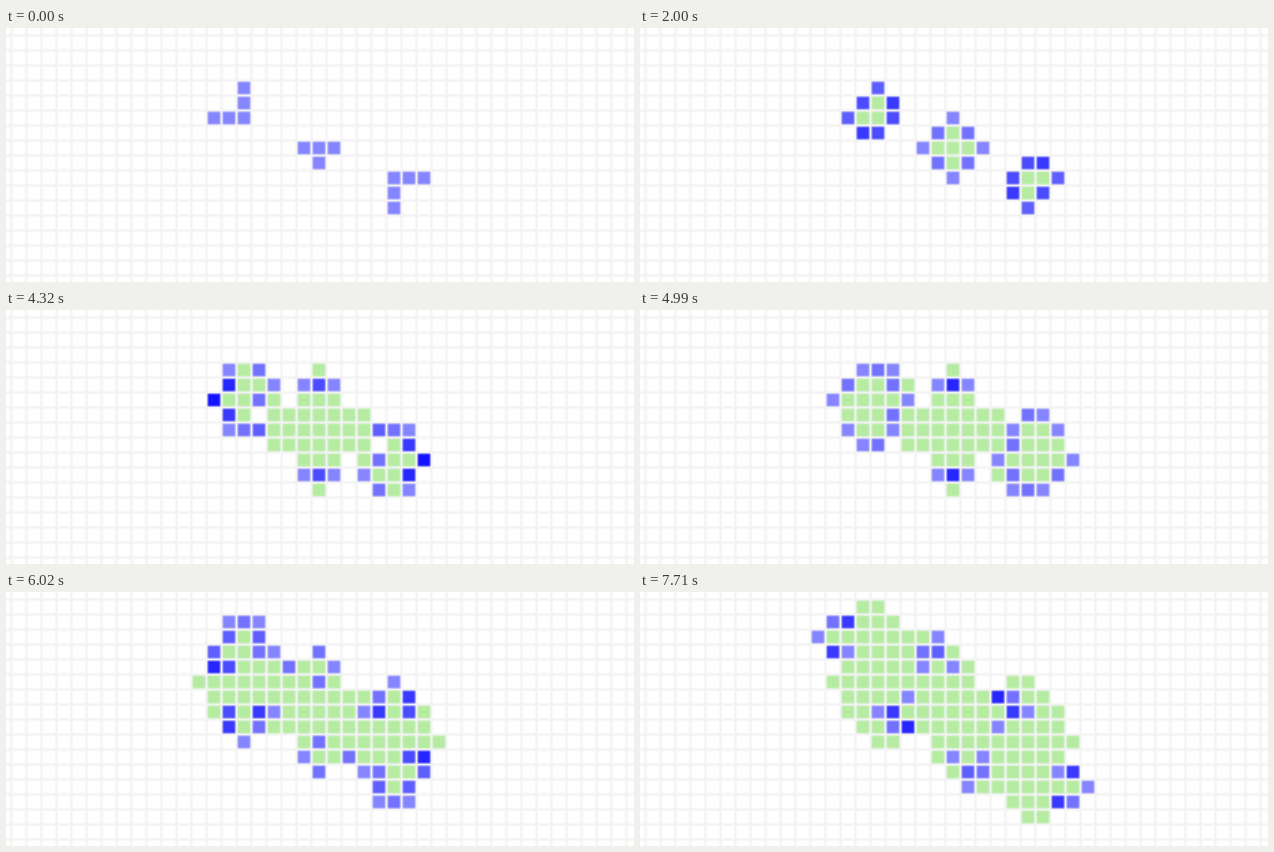
Write a matplotlib script that moves like this. It is 628 px wide and 254 px high and loops after 8000 ms.

```python
import matplotlib.pyplot as plt
import numpy as np
from matplotlib.animation import FuncAnimation

WIDTH, HEIGHT, DPI = 628, 254, 100
LOOP_MS, TICK_MS = 8000, 10
PITCH, OFFSET_X, OFFSET_Y = 15, 10, 8
EDGE = 2.5  # softness of a cell's border in pixels

GRID = np.array([243, 243, 243])
DEAD = np.array([255, 255, 255])
TRAIL = np.array([181, 236, 162])

# Moments at which the next generation appears
STEPS_MS = [420, 790, 1120, 1600, 2000, 2400, 2730, 3210, 3520, 3900, 4320,
            4660, 4990, 5290, 5540, 5770, 6020, 6270, 6520, 6840, 7070, 7390,
            7710]

# Starting shapes: (column, row, pattern)
SEEDS = [
    (14, 4, ["..#", "..#", "###"]),
    (20, 8, ["###", ".#."]),
    (26, 10, ["###", "#..", "#.."]),
]


def axis_cells(length, offset):
    """Cell index and coverage for every pixel along one axis."""
    pos = np.arange(length) + offset
    distance = np.abs(pos % PITCH - PITCH / 2)
    return pos // PITCH, np.clip((PITCH / 2 - distance) / EDGE, 0, 1)


COLS, COVER_X = axis_cells(WIDTH, OFFSET_X)
ROWS, COVER_Y = axis_cells(HEIGHT, OFFSET_Y)
COVER = np.outer(COVER_Y, COVER_X)[..., None]


def first_generation():
    """Age grid: positive is alive, negative was alive, zero is untouched."""
    age = np.zeros((ROWS[-1] + 1, COLS[-1] + 1), dtype=int)
    for col, row, pattern in SEEDS:
        for dy, line in enumerate(pattern):
            for dx, mark in enumerate(line):
                age[row + dy, col + dx] = mark == "#"
    return age


def next_generation(age):
    alive = age > 0
    neighbours = sum(np.roll(alive.astype(int), (dy, dx), (0, 1))
                     for dy in (-1, 0, 1) for dx in (-1, 0, 1) if dy or dx)
    stays = alive & ((neighbours == 2) | (neighbours == 3))
    born = ~alive & (neighbours == 3)
    return np.where(stays, age + 1,
                    np.where(born, 1, np.where(alive, -1, age)))


def paint(age):
    colors = np.empty(age.shape + (3,))
    colors[:] = DEAD
    colors[age < 0] = TRAIL
    level = 19 * np.abs(8 - age % 16)
    blues = np.stack([level, level, np.full_like(level, 255)], axis=-1)
    colors[age > 0] = blues[age > 0]
    pixels = colors[ROWS[:, None], COLS[None, :]]
    return np.rint(GRID + (pixels - GRID) * COVER).astype(np.uint8)


def build_pictures():
    age = first_generation()
    pictures = [paint(age)]
    for _ in STEPS_MS:
        age = next_generation(age)
        pictures.append(paint(age))
    return pictures


PICTURES = build_pictures()

fig = plt.figure(figsize=(WIDTH / DPI, HEIGHT / DPI), dpi=DPI)
ax = fig.add_axes([0, 0, 1, 1])
ax.axis("off")
board = ax.imshow(PICTURES[0], aspect="auto", interpolation="nearest")


def update(frame):
    generation = np.searchsorted(STEPS_MS, frame * TICK_MS, side="right")
    board.set_data(PICTURES[generation])
    return [board]


anim = FuncAnimation(fig, update, frames=LOOP_MS // TICK_MS,
                     interval=TICK_MS, repeat=True, repeat_delay=0)
plt.show()
```
